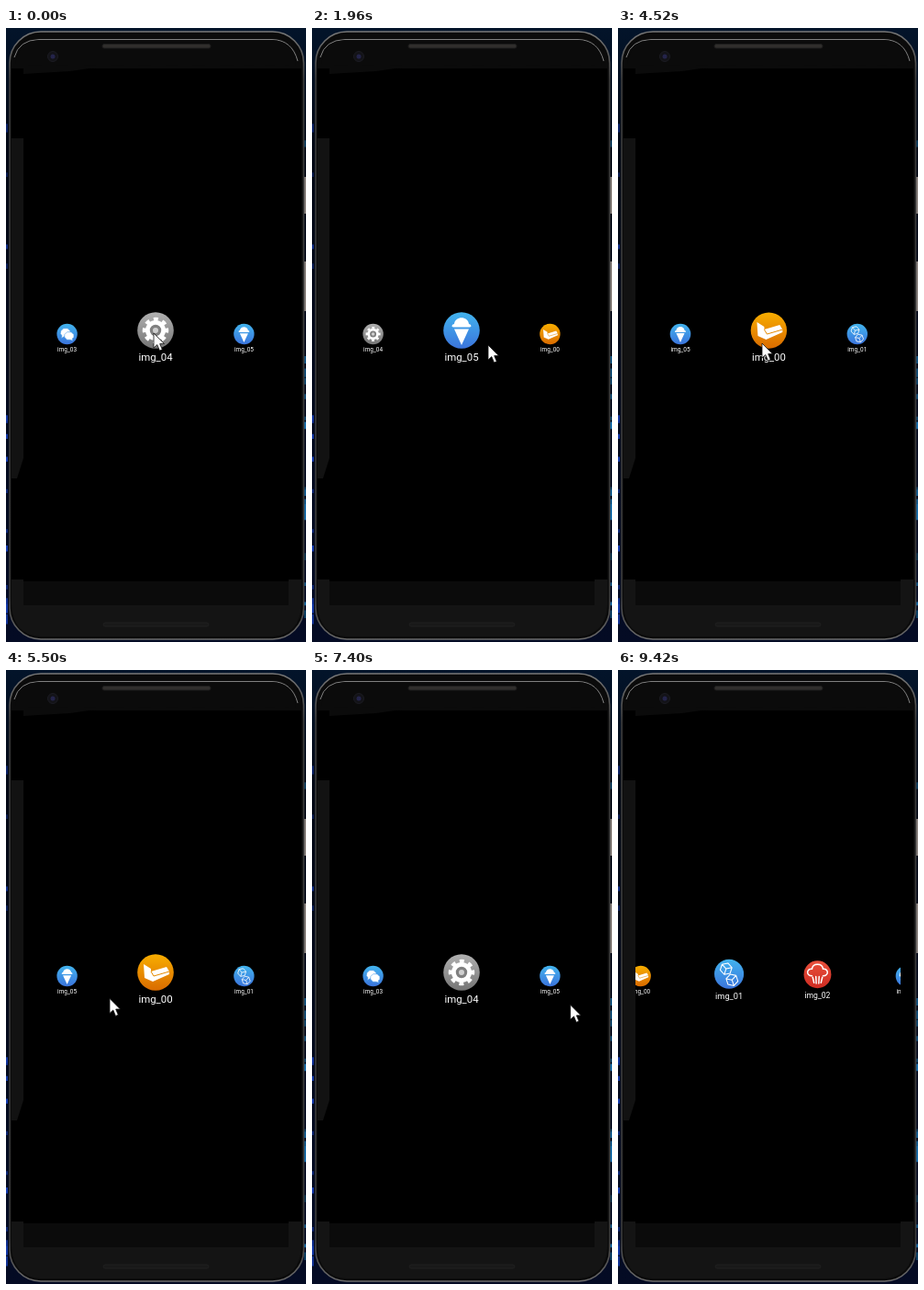
Recreate the animation shown at these times as an HTML page. Size 327 by 668 pixels, loop 9520 ms.

```html
<!DOCTYPE html>
<html lang="en">
<head>
<meta charset="utf-8">
<title>Icon carousel</title>
<style>
  html, body { margin: 0; width: 100%; height: 100%; overflow: hidden; background: #030d1f; }
  svg { display: block; width: 327px; height: 668px; }
  text { font: 11.4px Roboto, sans-serif; fill: #fff; text-anchor: middle; }
</style>
</head>
<body>
<svg viewBox="0 0 327 668">
  <defs>
    <linearGradient id="back" x2="0" y2="1">
      <stop stop-color="#03142a"/><stop offset=".2" stop-color="#020713"/><stop offset="1" stop-color="#040b24"/>
    </linearGradient>
    <linearGradient id="rim" x2="0" y2="1">
      <stop stop-color="#787878"/><stop offset=".08" stop-color="#3c3c3c"/>
      <stop offset=".93" stop-color="#3c3c3c"/><stop offset="1" stop-color="#6c6c6c"/>
    </linearGradient>
    <linearGradient id="orange" x2="0" y2="1"><stop stop-color="#f8ae00"/><stop offset="1" stop-color="#d96b00"/></linearGradient>
    <linearGradient id="blue" x2="0" y2="1"><stop stop-color="#42b4ee"/><stop offset="1" stop-color="#3b74dc"/></linearGradient>
    <linearGradient id="red" x2="0" y2="1"><stop stop-color="#e8503c"/><stop offset="1" stop-color="#cf2c22"/></linearGradient>
    <linearGradient id="grey" x2="0" y2="1"><stop stop-color="#b0b0b0"/><stop offset="1" stop-color="#757575"/></linearGradient>
    <clipPath id="screen"><path d="M19 44H308V628H19Z"/></clipPath>
    <path id="cube" d="M0-8L7-4V4L0 8L-7 4V-4ZM-7-4L0 0L7-4M0 0V8"/>
  </defs>

  <rect width="327" height="668" fill="url(#back)"/>
  <g id="glints"></g>
  <path d="M326 162V202M326 254V308" stroke="#8c8480" stroke-width="2"/>
  <rect x="4" y="4" width="320.5" height="661" rx="34" fill="#0b0b0b" stroke="url(#rim)" stroke-width="1.6"/>
  <path d="M9 32Q14 13 36 12.5H290Q312 13 318 36" fill="none" stroke="#808080"/>
  <path d="M10 40Q13 14 37 13H290Q313 14 316 41Z" fill="#0b0b0b"/>
  <path d="M6 44H322V602H6Z"/>
  <path d="M6 120H19V468L12 490H6Z" fill="#121212"/>
  <path d="M6 600H19V628H308V600H322V628Q320 660 291 662H37Q8 660 6 628Z" fill="#141414"/>
  <path d="M19 43H98L70 47L19 50Z" fill="#0b0b0b"/>
  <rect x="105" y="17.5" width="118" height="4.5" rx="2" fill="#302e2c" stroke="#1c1c1c"/>
  <rect x="106" y="647" width="115" height="4" rx="2" fill="#191919" stroke="#202020"/>
  <circle cx="51" cy="31" r="5.5" fill="#131318" stroke="#1c1c22"/>
  <circle cx="51" cy="31" r="2.5" fill="#24244a"/>

  <g id="carousel" clip-path="url(#screen)"></g>
  <path id="cursor" d="M0 0V16L3.8 12.6L6.5 19L9.3 17.8L6.7 11.6H11.5Z" fill="#fff" stroke="#111" stroke-width=".8"/>
</svg>

<script>
const LOOP = 9520, STEP = 140, SPACING = 96.4, CENTER_X = 163, PIVOT_Y = 338.2;

// Each icon fits a disc of radius 20 around the origin.
const icons = [
  ['orange', `<path fill="#fff" d="M-13-9L-5-4V-1L12-6L15-1V2L-3 10L-12 6Z"/>
    <path fill="none" stroke="#e58a00" d="M-5-1L-2 4L15-1"/>`],
  ['blue', `<g fill="none" stroke="#fff" stroke-width="1.3" stroke-linejoin="round">
    <use href="#cube" transform="translate(-4-7)rotate(18)"/>
    <use href="#cube" transform="translate(4 8)rotate(-18)"/></g>`],
  ['red', `<g fill="none" stroke="#fff" stroke-width="2" stroke-linecap="round">
    <path d="M-8 2C-17 2-16-9-8-8C-7-17 7-17 8-8C16-9 17 2 8 2"/>
    <path d="M-7 4L-5 12M-2.3 3L-1.8 13M2.3 3L1.8 13M7 4L5 12"/></g>`],
  ['blue', `<g fill="#fff" stroke="#3f94e6">
    <path d="M-12-6L-7-11H1L6-6V0L1 5H-6L-11 8L-10 3L-13-1Z"/>
    <path d="M-5 1L0-4H8L13 1V6L10 9L11 13L6 11H0L-5 6Z"/></g>`],
  ['grey', `<circle r="11" fill="#fff"/>
    <circle r="12" fill="none" stroke="#fff" stroke-width="4.5" stroke-dasharray="4.712" transform="rotate(-11.25)"/>
    <circle r="4.6" fill="#d0d0d0" stroke="#808080" stroke-width="3.2"/>`],
  ['blue', `<path fill="#fff" d="M-8.5-3.5C-12-3.5-10-7-8-7C-7-16 7-16 8-7C10-7 12-3.5 8.5-3.5ZM-8-1.5H8L0 16Z"/>`]
];

// Pointer stops: [step, x, y]
const pointerPath = [
  [1, 161, 332], [9, 50, 338], [14, 192, 345], [17, 255, 336], [21, 253, 336],
  [23, 220, 340], [32, 157, 343], [35, 157, 343], [40, 102, 361], [43, 102, 350],
  [45, 176, 335], [48, 270, 337], [59, 302, 412], [60, 297, 513], [63, 345, 690]
];

const progress = (step, from, to) => Math.min(1, Math.max(0, (step - from) / (to - from)));
const easeOut = u => u * (2 - u);

// Two swipes forward, one double swipe back, then a steady run forward.
const scrollAt = step => 4
  + easeOut(progress(step, 1.5, 11))
  + easeOut(progress(step, 21, 33.5))
  - 2 * easeOut(progress(step, 43.5, 50.5))
  + 3.435 * progress(step, 56.6, 67);

function pointerAt(step) {
  let [, x, y] = pointerPath[0];
  for (let i = 1; i < pointerPath.length; i++) {
    const [from, x0, y0] = pointerPath[i - 1], [to, x1, y1] = pointerPath[i];
    const u = progress(step, from, to);
    x += (x1 - x0) * u;
    y += (y1 - y0) * u;
  }
  return [x, y];
}

let seed = 7;
const random = () => (seed = seed * 16807 % 2147483647) / 2147483647;
document.getElementById('glints').innerHTML = Array.from({ length: 36 }, (_, i) => {
  const right = i % 2, y = 100 + 560 * Math.sqrt(random());
  return `<path d="M${right ? 326 : 1} ${y}v${3 + 7 * random()}" stroke-width="2"
    stroke="hsl(${right ? 205 : 225} 80% ${15 + 25 * random()}%)"/>`;
}).join('');

const carousel = document.getElementById('carousel');
const cursor = document.getElementById('cursor');
carousel.innerHTML = icons.map(([color, art], i) => `<g>
  <g transform="translate(0 -9.2)"><circle r="19.8" fill="url(#${color})"/>${art}</g>
  <text y="24.3">img_0${i}</text></g>`).join('');
const items = [...carousel.children];

function draw(now) {
  const step = Math.floor(now % LOOP / STEP);
  const scroll = scrollAt(step);
  items.forEach((item, i) => {
    const offset = (i - scroll + 15) % 6 - 3;
    const scale = 1 - 0.435 * Math.min(1, Math.abs(offset));
    item.setAttribute('transform',
      `translate(${CENTER_X + offset * SPACING} ${PIVOT_Y}) scale(${scale})`);
  });
  cursor.setAttribute('transform', `translate(${pointerAt(step)})`);
}

const start = performance.now();
function tick() {
  draw(performance.now() - start);
  requestAnimationFrame(tick);
}
tick();
</script>
</body>
</html>
```
